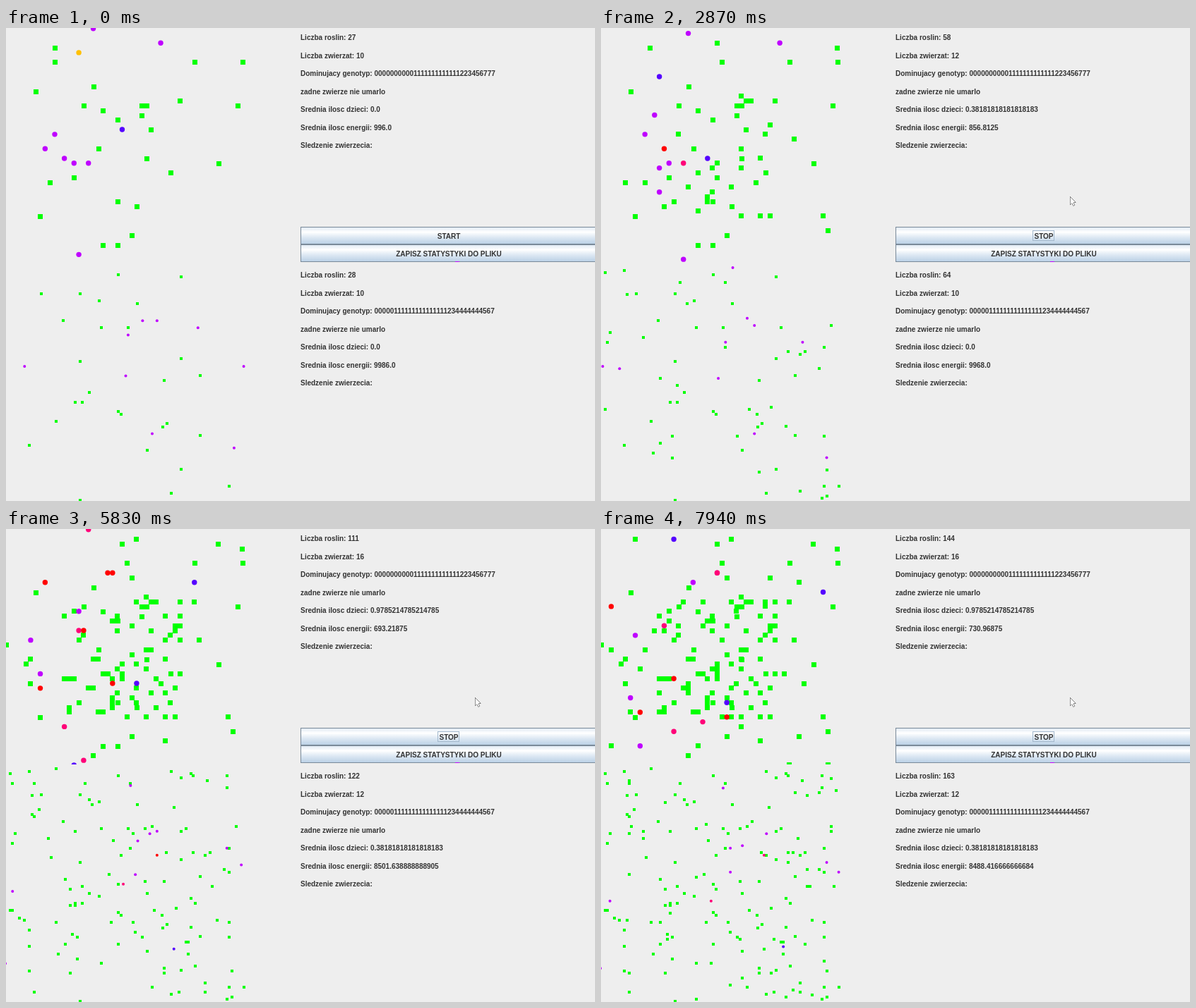
Recreate the animation shown at these times as an HTML page with a canvas. Size 834 by 671 pixels, loop 8000 ms.

```html
<!DOCTYPE html>
<html lang="pl">
<head>
<meta charset="utf-8">
<style>
  html, body { margin: 0; width: 100%; height: 100%; overflow: hidden; background: #eee; }
  canvas { display: block; }
</style>
</head>
<body>
<canvas id="stage" width="834" height="671"></canvas>
<script>
const ctx = document.getElementById('stage').getContext('2d');
const LOOP = 8000, SIZE = 341, DAY = 103, FIRST_DAY = 950, LAST_DAY = 67;
const KEY_DAYS = [0, 10, 27, 39, 54, LAST_DAY];
const COLORS = { p: '#bf00ff', b: '#5500ff', o: '#ffc000', r: '#ff0000', k: '#ff0078' };

// An animal: one colour letter per key day (fewer when born later), first place, last place.
const upper = {
  x0: 0.8, y0: 0.8, cell: 6.82, square: 7, radius: 3.7, top: 0, bottom: 334, textY: 17,
  seed: 4241, jungle: 0.65,
  genotype: '0'.repeat(10) + '1'.repeat(13) + '223456777',
  plantCount: [27, 44, 74, 97, 124, 144],
  born: [10, 12, 13, 16],
  children: [0, 0.38181818181818183, 0.5484848484848485, 0.9785214785214785],
  energy: [996, 864.8125, 820.5, 691.21875, 694.96875, 730.96875],
  eaten: [5, 20, 20, 60, 60],
  plants: [
    69,48, 69,28, 62,219, 137,308, 158,308, 267,48, 335,48, 42,90, 124,83,
    110,110, 137,117, 158,130, 192,110, 199,110, 192,124, 246,103, 328,110, 205,144,
    131,171, 199,185, 301,192, 233,205, 96,212, 158,246, 185,253, 48,267, 178,294],
  animals: [
    ['pppbbb', 219,21, 314,90],
    ['ppbbbb', 103,321, 103,14],
    ['obrrrr', 103,35, 14,110],
    ['bbbbbb', 164,144, 178,246],
    ['pppppp', 69,151, 130,76],
    ['pppppp', 55,171, 48,151],
    ['pppppp', 82,185, 41,239],
    ['pppkkk', 96,191, 89,137],
    ['ppkkkp', 117,191, 55,307],
    ['pprrrk', 124,1, 164,62],
    ['rrrrr', 89,164, 55,260],
    ['kkrrr', 96,178, 178,267],
    ['krk', 124,76, 164,62],
    ['rrr', 103,103, 103,212],
    ['kkk', 124,8, 144,273],
    ['rkk', 137,8, 103,287]]
};

const lower = {
  x0: -1, y0: 336.7, cell: 3.41, square: 4, radius: 2, top: 337, bottom: 671, textY: 354,
  seed: 7919, jungle: 0,
  genotype: '0'.repeat(5) + '1'.repeat(15) + '234444444567',
  plantCount: [28, 48, 82, 107, 135, 163],
  born: [10, 10, 12],
  children: [0, 0, 0.38181818181818183],
  energy: [9986, 9976, 8505.416666666684, 8500.750000000016, 8502.416666666684, 8488.416666666684],
  eaten: [],
  plants: [
    159,350, 248,353, 50,377, 105,377, 132,387, 186,391, 81,415, 135,425, 173,425, 105,473,
    248,469, 275,493, 224,500, 118,517, 98,531, 108,531, 159,544, 163,548, 71,558,
    222,566, 228,561, 275,578, 33,592, 200,599, 248,626, 316,650, 234,660, 105,670],
  animals: [
    ['pppppp', 26,479, 13,527],
    ['pppppp', 336,479, 336,486],
    ['pppppp', 271,425, 319,473],
    ['pppppp', 323,595, 0,623],
    ['ppppbb', 207,575, 258,592],
    ['pppppp', 193,415, 234,432],
    ['pppppp', 214,415, 200,449],
    ['pppppp', 173,435, 183,452],
    ['pppppp', 169,493, 183,486],
    ['pppppp', 197,334, 173,367],
    ['rrrk', 217,459, 231,462],
    ['rkkk', 176,497, 156,527]]
};

const mod = (a, n) => ((a % n) + n) % n;
const lerp = (a, b, u) => a + (b - a) * u;
const clamp01 = v => Math.max(0, Math.min(1, v));
const snap = (v, origin, cell) => origin + Math.round((v - origin) / cell) * cell;

function random(seed) {
  return () => (seed = seed * 16807 % 2147483647) / 2147483647;
}

// New plants sprout at random, in the upper world mostly in its central jungle.
function sprout(w) {
  const rnd = random(w.seed);
  const total = w.plantCount[5] + w.eaten.length;
  while (w.plants.length / 2 < total) {
    const inside = rnd() < w.jungle;
    const x = inside ? lerp(80, 250, rnd()) : rnd() * SIZE;
    const y = inside ? lerp(95, 270, rnd()) : w.top + rnd() * 333;
    w.plants.push(snap(x, w.x0, w.cell), snap(y, w.y0, w.cell));
  }
}

function phaseOf(day) {
  let k = 5;
  while (KEY_DAYS[k] > day) k--;
  const next = Math.min(k + 1, 5);
  const u = next > k ? (day - KEY_DAYS[k]) / (KEY_DAYS[next] - KEY_DAYS[k]) : 0;
  return { day, k, next, u, near: u < 0.5 ? k : next };
}

const smooth = (v, { k, next, u }) => lerp(v[k], v[next], u);
const held = (v, i) => v[Math.min(i, v.length - 1)];

function energyAt(w, ph) {
  const steady = held(w.children, ph.k) === held(w.children, ph.next);
  return steady ? smooth(w.energy, ph) : w.energy[ph.near] + KEY_DAYS[ph.near] - ph.day;
}

const decimal = v => Number.isInteger(v) ? v.toFixed(1) : String(v);

function drawAnimal(w, [colors, x1, y1, x2, y2], index, { day, near }) {
  const late = 6 - colors.length;
  if (near < late) return;
  const u = clamp01((day - KEY_DAYS[late]) / (LAST_DAY - KEY_DAYS[late]));
  const walk = (a, b, origin, turn) => {
    const delta = mod(b - a + SIZE / 2, SIZE) - SIZE / 2;
    const wobble = Math.sin(Math.PI * u) * 3 * Math.sin(index * 5 + day * 0.5 + turn);
    const low = origin - w.cell / 2;
    return low + mod(snap(a + delta * u + wobble * w.cell, origin, w.cell) - low, SIZE);
  };
  ctx.fillStyle = COLORS[colors[near - late]];
  ctx.beginPath();
  ctx.arc(walk(x1, x2, w.x0, 0), walk(y1, y2, w.y0, 2), w.radius, 0, 7);
  ctx.fill();
}

function drawWorld(w, ph) {
  ctx.save();
  ctx.beginPath();
  ctx.rect(0, w.top, 400, w.bottom - w.top);
  ctx.clip();
  ctx.fillStyle = '#00ff00';
  const count = Math.round(smooth(w.plantCount, ph));
  for (let i = 0, shown = 0; shown < count; i++) {
    if (ph.day >= w.eaten[i]) continue;
    const [x, y] = w.plants.slice(i * 2, i * 2 + 2);
    ctx.fillRect(Math.round(x - w.square / 2), Math.round(y - w.square / 2), w.square, w.square);
    shown++;
  }
  w.animals.forEach((a, i) => drawAnimal(w, a, i, ph));
  ctx.restore();

  ctx.fillStyle = '#333';
  ctx.textAlign = 'left';
  [
    'Liczba roslin: ' + count,
    'Liczba zwierzat: ' + held(w.born, ph.near),
    'Dominujacy genotyp: ' + w.genotype,
    'zadne zwierze nie umarlo',
    'Srednia ilosc dzieci: ' + decimal(held(w.children, ph.near)),
    'Srednia ilosc energii: ' + decimal(energyAt(w, ph)),
    'Sledzenie zwierzecia:'
  ].forEach((line, i) => ctx.fillText(line, 417, Math.round(w.textY + i * 25.5)));
}

function drawButton(y, label, hover, focus) {
  const g = ctx.createLinearGradient(0, y, 0, y + 25);
  g.addColorStop(0, '#dde8f3');
  g.addColorStop(0.3, '#fff');
  g.addColorStop(0.6, '#dde8f3');
  g.addColorStop(1, '#b8cfe5');
  ctx.fillStyle = g;
  ctx.fillRect(417, y, 420, 25);
  ctx.lineWidth = 1;
  ctx.strokeStyle = '#7a8a99';
  ctx.strokeRect(417.5, y + 0.5, 419, 24);
  if (hover) {
    ctx.strokeStyle = '#98b0c8';
    ctx.strokeRect(418.5, y + 1.5, 417, 22);
  }
  if (focus) {
    ctx.strokeStyle = '#a3b8cc';
    ctx.strokeRect(611.5, y + 5.5, 30, 14);
  }
  ctx.fillStyle = '#333';
  ctx.textAlign = 'center';
  ctx.fillText(label, 627, y + 17);
}

function cursorAt(t) {
  if (t < 200) return null;
  const come = 1 - (1 - clamp01((t - 200) / 690)) ** 2;
  const leave = clamp01((t - 1080) / 450);
  return [lerp(lerp(672, 641, come), 664, leave), lerp(lerp(666, 293, come), 239, leave)];
}

const arrow = new Path2D('M0 0V11L2.5 8.7 4.3 12.6 5.9 11.9 4.2 8H7.5Z');

function drawCursor([x, y]) {
  ctx.save();
  ctx.translate(Math.round(x) + 0.5, Math.round(y) + 0.5);
  ctx.fillStyle = '#fff';
  ctx.strokeStyle = '#222';
  ctx.stroke(arrow);
  ctx.fill(arrow);
  ctx.restore();
}

function draw(t) {
  const day = Math.max(0, Math.min(LAST_DAY, Math.floor((t - FIRST_DAY) / DAY)));
  const ph = phaseOf(day), cursor = cursorAt(t), running = t >= 1050;
  const over = y => !!cursor && cursor[1] >= y && cursor[1] < y + 25;
  ctx.fillStyle = '#eee';
  ctx.fillRect(0, 0, 834, 671);
  ctx.font = 'bold 10px "Liberation Sans", Arial, sans-serif';
  drawWorld(upper, ph);
  drawWorld(lower, ph);
  drawButton(282, running ? 'STOP' : 'START', over(282), running);
  drawButton(307, 'ZAPISZ STATYSTYKI DO PLIKU', over(307), false);
  ctx.fillStyle = COLORS.p;
  ctx.fillRect(636, 331, 6, 1);
  if (cursor) drawCursor(cursor);
}

sprout(upper);
sprout(lower);
const start = performance.now();
function tick() {
  draw((performance.now() - start) % LOOP);
  requestAnimationFrame(tick);
}
tick();
</script>
</body>
</html>
```
